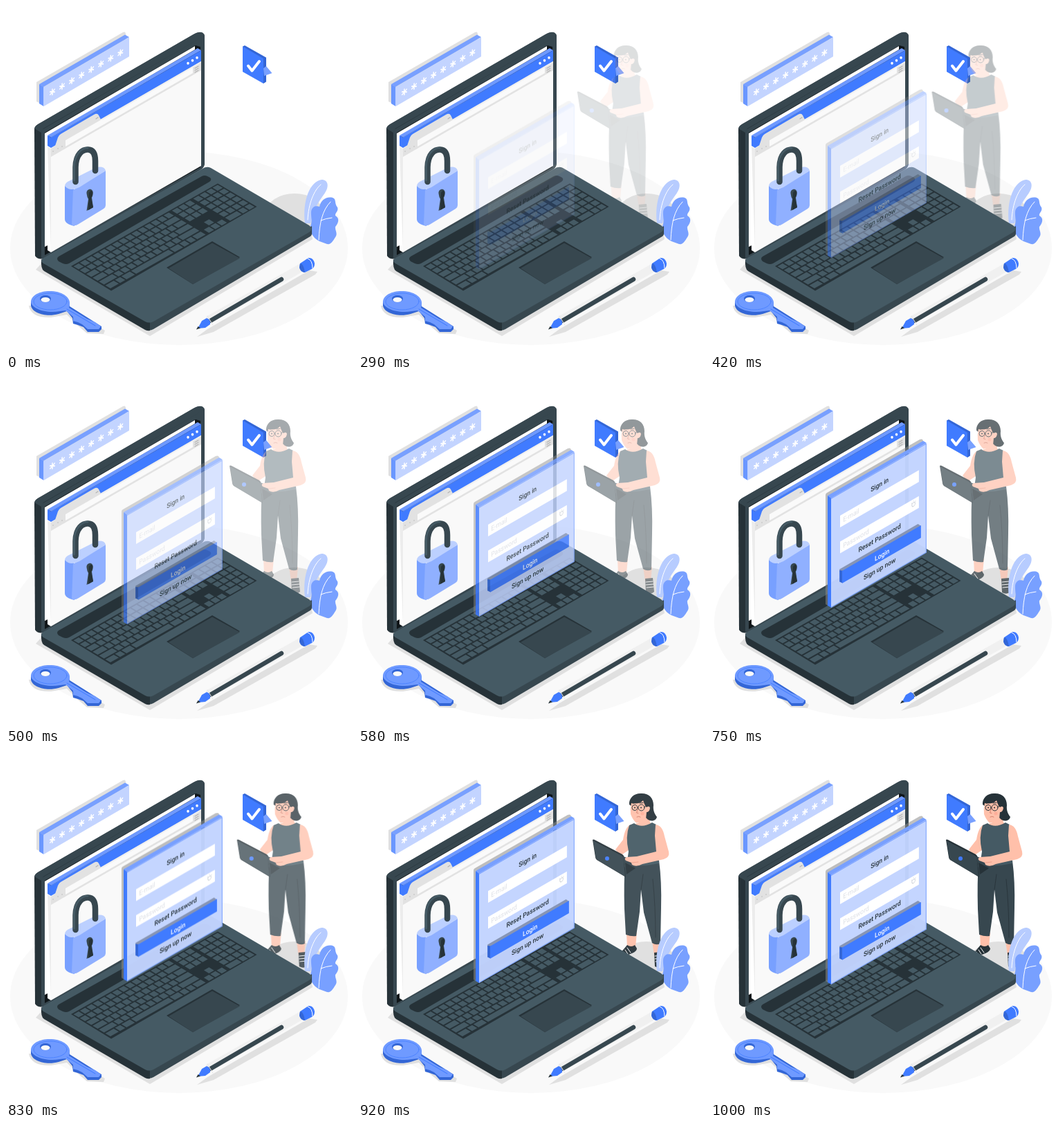
An HTML page for the animation above (1.04 s loop, 500 by 500 pixels).

```html
<!DOCTYPE html>
<html lang="en">
<head>
<meta charset="utf-8">
<title>Sign in illustration</title>
<style>
  html, body { margin: 0; width: 100%; height: 100%; overflow: hidden; background: #fff; }
  svg { display: block; width: 100vw; height: 100vh; }
  text { font: 500 9.8px Roboto, sans-serif; fill: #263238; text-anchor: middle; }
  .hint { fill: #dcdfe6; text-anchor: start; font-weight: 400; }
  .line { fill: none; stroke-linecap: round; stroke-linejoin: round; }
  .ink { fill: #263238; }
  .slate { fill: #37474f; }
  .steel { fill: #455a64; }
  .blue { fill: #407bff; }
  .sky { fill: #78a0ff; }
  .navy { fill: #3366d6; }
  .shade { fill: #e0e0e0; }
  .skin { fill: #ffc0aa; }
  #panel { animation: rise 1040ms infinite; }
  #woman { animation: enter 1040ms infinite; }

  /* Both moves advance in short holds of about 40 ms. */
  @keyframes rise {
    0%     { transform: translateY(60px); opacity: 0; animation-timing-function: steps(1); }
    7.69%  { transform: translateY(59.6px); opacity: .01; animation-timing-function: steps(3); }
    19.23% { transform: translateY(55px); opacity: .06; animation-timing-function: steps(2); }
    27.88% { transform: translateY(47.5px); opacity: .16; animation-timing-function: steps(5); }
    48.07% { transform: translateY(20px); opacity: .66; animation-timing-function: steps(2); }
    55.76% { transform: translateY(9px); opacity: .85; animation-timing-function: steps(2); }
    64.42% { transform: translateY(-1px); opacity: 1; animation-timing-function: steps(2); }
    72.11% { transform: translateY(-4px); opacity: 1; animation-timing-function: steps(2); }
    79.8%  { transform: translateY(-4.5px); opacity: 1; animation-timing-function: steps(2); }
    88.46% { transform: translateY(-2px); opacity: 1; animation-timing-function: steps(2); }
    96.15%, 100% { transform: none; opacity: 1; }
  }
  @keyframes enter {
    0%     { transform: translateX(-30px); opacity: 0; animation-timing-function: steps(1); }
    7.69%  { transform: translateX(-29.4px); opacity: .02; animation-timing-function: steps(5); }
    27.88% { transform: translateX(-24.2px); opacity: .16; animation-timing-function: steps(5); }
    48.07% { transform: translateX(-18px); opacity: .41; animation-timing-function: steps(2); }
    55.76% { transform: translateX(-15px); opacity: .5; animation-timing-function: steps(4); }
    72.11% { transform: translateX(-9px); opacity: .7; animation-timing-function: steps(4); }
    88.46% { transform: translateX(-2px); opacity: .94; animation-timing-function: steps(2); }
    96.15%, 100% { transform: none; opacity: 1; }
  }
</style>
</head>
<body>
<svg viewBox="0 0 500 500">
  <ellipse cx="250" cy="350" rx="244" ry="140" fill="#f9f9f9"/>
  <ellipse class="shade" cx="417" cy="298" rx="41" ry="27"/>

  <g id="bubble">
    <path class="navy" d="M342 58.500L345 57 376 74.500V109.500L372 112Z"/>
    <path class="blue" d="M342 58.500L372 76V112L342 95Z"/>
    <path class="sky" d="M372 90L376 87 384.500 97 373 101Z"/>
    <path class="line" d="M350 86.500L355.500 93.500 366 80" stroke="#fff" stroke-width="4"/>
  </g>

  <g id="woman">
    <path class="skin" d="M390 258H405L403 279 391 280ZM427 270H440L438 291H430Z"/>
    <path class="ink" d="M391 276Q397 280 402 276L405 281Q405 285 398 288L385 293Q380 293 381 288ZM430 287L441 286 443 306Q438 311 431 307Z"/>
    <path class="line" d="M385 286L389 291M388 283L392 289M391 280L396 287M431 292L441 291M431 296L442 295M432 300L442 299" stroke="#fff"/>
    <path class="slate" d="M388 158L437 154Q441 184 440 222L439 274Q433 277 427 273L415 229 411 196 409 228 404 263Q397 264 389 261L387 224Q386 184 388 158Z"/>
    <path class="line" d="M411 196L414 174M428 181Q432 220 432 265" stroke="#263238" stroke-width=".8"/>
    <path class="skin" d="M396 102Q388 105 385 124L374 138 381 147 393 139 399 114Z"/>
    <path class="skin" d="M407 88H423L424 99Q429 101 430 103 414 112 400 102L408 99Z"/>
    <path class="steel" d="M401 100Q412 108 427 99L433 102 435 134 437 158Q414 163 390 161L393 141Q388 119 394 103Z"/>
    <path class="ink" d="M341 124Q342 123 344 124L384 145Q387 147 387 150L389 178 347 153Q345 151 345 149Z"/>
    <path class="slate" d="M342 125.500L383 147Q385 148 385.500 151L388 177 348 153Q346 151 345.500 149Z"/>
    <path class="slate" d="M385 148L391 150 412 164 410 168 390 178Z"/>
    <path class="ink" d="M388 157L403 165 390 174Z"/>
    <circle class="blue" cx="362" cy="151" r="3"/>
    <path class="skin" d="M432 102Q442 103 445 119L451 141Q453 149 444 152L413 159Q404 164 398 160L397 157 389 154Q386 151 390 149L405 148 433 141 431 118Z"/>
    <path class="line" d="M398 157L407 156" stroke="#e99782" stroke-width=".8"/>
    <path class="ink" d="M394 73C393 63 402 56 412 57 423 57 429 64 429 74 428 82 431 87 434 91 432 98 423 98 419 93L402 79Z"/>
    <path class="skin" d="M397 71Q409 73 414 67 416 74 419 77 423 74 424 78 423 84 419 84L418 94Q410 99 404 99.500 399 95 396 87 395 79 397 71Z"/>
    <g class="line" stroke="#263238">
      <circle cx="402" cy="77.500" r="4"/>
      <circle cx="411.500" cy="77.500" r="4.500"/>
      <path d="M416 76L421 75M399 71L403 70.500M409 71L414 70.500"/>
      <path d="M402 77.500h.1M411 77.500h.1" stroke-width="2"/>
      <path d="M406.500 79L404.500 85 407 85.500M405 91Q408 89.500 410 91" stroke="#c9705f" stroke-width=".8"/>
    </g>
    <circle cx="413" cy="86" r="2.500" fill="#ff9c87" opacity=".5"/>
  </g>

  <g id="leaves">
    <path fill="#b7ccff" d="M432 314C428 280 440 253 456 251 466 251 467 261 461 270 456 278 446 288 440 314Z"/>
    <path class="sky" d="M453 340C444 336 437 325 441 315 443 306 438 296 444 291 448 288 451 290 453 290 455 281 462 275 472 277 478 279 474 285 479 291 481 297 475 299 476 303 483 307 480 314 476 319 475 324 480 328 476 334 472 340 470 345 464 344Z"/>
    <path class="line" d="M436 309C437 286 445 266 455 258M452 338C453 314 457 295 469 283M455 310Q462 307 471 306" stroke="#fff"/>
  </g>

  <g id="lid">
    <path class="shade" d="M43 381L52 371 207 464 441 328 443 337 208 477Z"/>
    <path class="ink" d="M41 179Q41 174 46 171L271 41Q284 34 287 43V226Q287 232 282 236L63 363Q47 369 42 361Z"/>
    <path class="slate" d="M51 183Q51 179 55 177L276 49Q283 42 287 43V227Q287 233 282 236L61 364 51 365Z"/>
    <path class="slate" d="M41 177Q42 173 46 171L271 41Q283 34 287 42L280 47 54 177 51 183Z"/>
    <path fill="#101619" d="M56 183L274 57 281 59V233L56 360Z"/>
    <path fill="#fff" d="M56 184L273 58V63L62 187V345L56 348Z"/>
  </g>

  <g id="window">
    <path fill="#fff" d="M60 188L65 191V356L60 353Z"/>
    <path fill="#f9f9f9" d="M65 190L282 65V231L65 356Z"/>
    <path fill="#6e99ff" d="M60 187L277 61 282 64 65 190Z"/>
    <path class="blue" d="M60 187L65 190 282 64V80L65 205 60 202Z"/>
    <path class="shade" d="M60 203L65 206V356" opacity=".6"/>
    <path fill="#e2e2e2" d="M71 202L75 190Q76 187 79 185L127 157Q132 154 134 158L137 164 282 80V93L65 218V206Z"/>
    <path fill="#fafafa" d="M86 194L270 88V97L86 203Z"/>
    <path fill="#f0f0f0" d="M139 163L282 80V82L139 165Z"/>
    <path class="line" d="M68 210h.1M75 206h.1M81 203h.1M130 163L133 161M273 90L278 87M273 93L278 90M273 96L278 93" stroke="#b5b5b5" stroke-width="1.300"/>
    <path class="line" d="M263 82.500v.5M269.500 78.500v.5M276 74.500v.5" stroke="#fff" stroke-width="3.500"/>
  </g>

  <g id="lock">
    <path class="sky" d="M85 260L99 265V318Q85 315 85 308Z"/>
    <path fill="#90b0ff" d="M97 266L144 238V288Q144 291 141 293L105 315Q99 319 95 316Z"/>
    <path fill="#bcd0ff" d="M85 260Q85 257 89 254L131 233Q142 231 144 238L106 262Q92 269 85 260Z"/>
    <path class="line" d="M100.500 254V233C101 213 111 207 119 207.500 127 208 129 216 129 224V238" stroke="#37474f" stroke-width="8.500"/>
    <path class="line" d="M98.500 252V232C99 213 110 205 118 205" stroke="#455a64" stroke-width="3"/>
    <path class="slate" d="M116.500 271C116 266 120 264 123 265 127 267 126 273 124 277L126 291 116.500 296 119 279Q117 276 116.500 271Z"/>
    <path class="ink" d="M120 270Q122 265 125 268 126 273 123 277L126 291 119 295Z"/>
  </g>

  <g id="base">
    <path class="slate" d="M207 455L442 318V329Q442 332 438 334L213 467Q208 470 203 468Z"/>
    <path class="ink" d="M51 366L208 456V469Q205 470 201 468L55 383Q50 380 51 366Z"/>
    <path class="steel" d="M54 364L284 235Q290 231 296 234L438 317Q445 322 438 327L213 456Q207 459 201 456L54 372Q48 368 54 364Z"/>
    <path class="ink" d="M76 362L283 246Q287 244 291 246L295 248Q298 251 294 254L91 372Q87 374 82 372L76 369Q72 365 76 362Z"/>
    <path class="ink" d="M94 376L306 256.500 362.500 290 152 411.500Z"/>
    <path id="keys" fill="#455a64" transform="matrix(9.3 -5.260 9.2 5.5 95.700 376.200)"/>
    <path class="ink" d="M232 378L298 340 338 363 270 402Z"/>
    <path class="slate" d="M235 379L298 342.500 338 364.500 270 402Z"/>
  </g>

  <g id="field">
    <path class="shade" d="M44 110L169 38Q173 36 173 41V50L48 122V140L44 138Z"/>
    <path class="sky" d="M48 113L172 41.500 178 45 54 117Z"/>
    <path fill="#6a97ff" d="M48 113L54.500 117V145L48 141Z"/>
    <path fill="#c3d4ff" d="M54.500 117L178 45V73L54.500 145Z"/>
    <g id="stars" class="line" stroke="#fff" stroke-width="1.800"></g>
  </g>

  <g id="key">
    <path class="shade" d="M33 433Q36 451 65 450L88 446 104 462 117 473 141 474 143 469 92 438Z"/>
    <path class="navy" d="M36 427V433C38 444 58 450 76 445L88 441 96 451 97 459 104 461 112 464 118 471H134L138 467V463L92 434V428Z"/>
    <path fill="#6f9aff" d="M36 427C37 417 51 411 66 412 83 413 94 422 92 432L91 436 117 452 129 457 137 463 134 467H118L110 460 104 457 97 455V449L86 440 78 441C57 445 36 437 36 427Z"/>
    <path class="line" d="M88 438L129 462" stroke="#407bff"/>
    <ellipse class="line" cx="64" cy="427" rx="24" ry="12" stroke="#4d84ff"/>
    <ellipse class="navy" cx="57" cy="423" rx="8" ry="5"/>
    <ellipse cx="57" cy="424.500" rx="6.500" ry="3.500" fill="#fafafa"/>
  </g>

  <g id="pen">
    <path class="shade" d="M276 478L291 467 438 382 450 384 447 388 300 471Z"/>
    <path class="line" d="M294 453L427 378" stroke="#f0f0f0" stroke-width="12"/>
    <path class="line" d="M296 454.500L398 395" stroke="#37474f" stroke-width="6.500"/>
    <path class="blue" d="M277 466L283 455 290 451Q296 453 295 460L288 465Z"/>
    <path class="ink" d="M275 467.500L277.500 463 281 465.500Z"/>
    <path class="line" d="M291 448L299 461" stroke="#e6e6e6"/>
    <path class="blue" d="M425 372L437 364Q444 363 446 372 446 378 442 380L432 385Q426 385 424 378Z"/>
    <path class="navy" d="M425 372Q430 372 432 385 426 385 424 378Z"/>
    <path class="line" d="M436 365Q443 367 443 379" stroke="#fff"/>
  </g>

  <g id="panel">
    <path fill="#8d8d8d" opacity=".55" d="M167 170Q167 168 169 167L303 90Q308 88 308 93L170 172V330L167 328Z"/>
    <path class="sky" d="M170 171L308 92 313 95 175 175Z"/>
    <path class="blue" d="M170 171L175.500 175V333L170 330Z"/>
    <g transform="matrix(.866 -.5 0 1 175 175)">
      <path fill="#c3d4ff" opacity=".97" d="M0 0H159V158H0Z"/>
      <path class="line" d="M0 .5H158.500V157.500H0" stroke="#6e99ff"/>
      <path fill="#fff" d="M15 32.500H146.500v17H15ZM15 70H146.500v17H15Z"/>
      <path fill="#8795b5" d="M14 109.500H145L150 115H19.600L14 113Z"/>
      <path class="navy" d="M14 111L19 114V132L14 127.500Z"/>
      <path class="blue" d="M18.500 114H150v18H18.500Z"/>
      <circle class="line" cx="137.500" cy="77.500" r="2.700" stroke="#cfd3da"/>
      <path class="line" d="M134 74l1 1M141 74l-1 1M137.500 72v1" stroke="#dfe2e8"/>
      <text x="81" y="24">Sign in</text>
      <text class="hint" x="20" y="44.500">E-mail</text>
      <text class="hint" x="20" y="82">Password</text>
      <text x="81" y="101">Reset Password</text>
      <text x="85" y="127.500" style="fill:#fff">Login</text>
      <text x="81" y="145.500">Sign up now</text>
    </g>
  </g>
</svg>
<script>
  const gap = 0.1;
  let keys = "";
  const key = (x, y, w = 1) => {
    keys += `M${x + gap} ${y + gap}h${w - 2 * gap}v${1 - 2 * gap}h${2 * gap - w}z`;
  };
  const row = (x, y, widths) => widths.forEach(w => { key(x, y, w); x += w; });
  const ones = n => Array(n).fill(1);

  // Main block: each row is 15 units wide.
  [
    ones(15),
    [...ones(13), 2],
    [1.5, ...ones(12), 1.5],
    [1.75, ...ones(11), 2.25],
    [2.25, ...ones(10), 2.75],
    [1.5, 1, 1.5, 6, 1.5, 1, 1, 1.5]
  ].forEach((widths, y) => row(0, y, widths));

  // Navigation block, arrows and number pad.
  for (let y = 0; y < 3; y++) row(15.3, y, ones(3));
  key(16.3, 4);
  row(15.3, 5, ones(3));
  for (let y = 0; y < 6; y++) row(18.6, y, y === 5 ? [2, 1, 1] : ones(4));
  document.getElementById("keys").setAttribute("d", keys);

  const star = "M0 -4V4M-3.700 -2L3.700 2M-3.700 2L3.700 -2";
  document.getElementById("stars").innerHTML = Array.from({ length: 8 }, (_, i) =>
    `<path d="${star}" transform="matrix(.866 -.5 0 1 ${67 + 14.05 * i} ${124.2 - 8.1 * i})"/>`
  ).join("");
</script>
</body>
</html>
```
